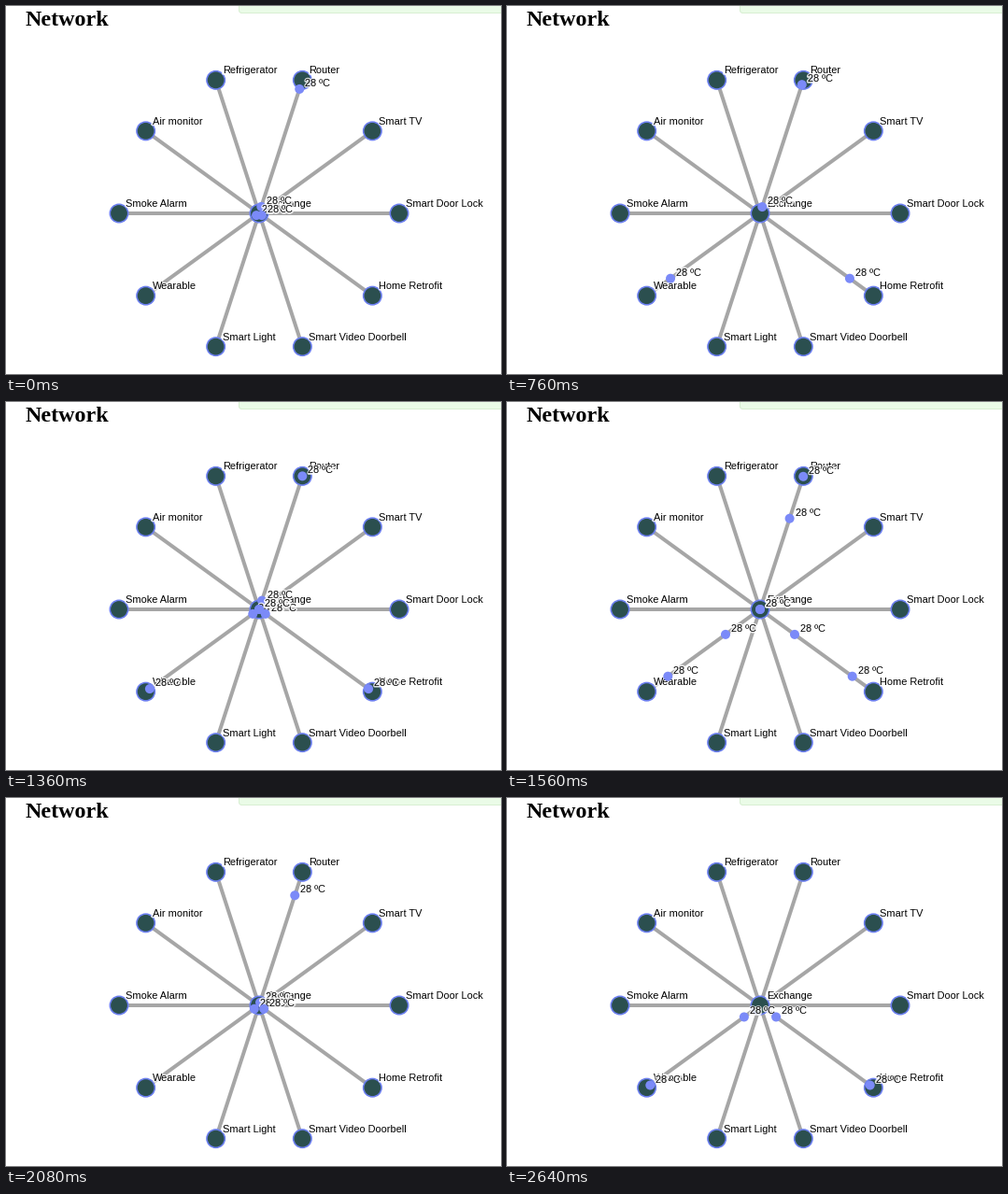
A matplotlib script that plays this animation: 530 px wide and 394 px high, repeating every 2.68 s.

```python
import math

import matplotlib.pyplot as plt
from matplotlib.animation import FuncAnimation
from matplotlib.patches import Circle, FancyBboxPatch
from matplotlib.patheffects import Stroke

W, H, DPI = 530, 394, 100
PX = 72 / DPI            # points per pixel
STEP, FRAMES = 40, 67    # ms per frame, frames per loop
TRAVEL = 500             # ms a packet needs for one spoke
HUB, RADIUS = (271, 222), 150

SLATE, RIM, PACKET, LINK = "#2b4f4f", "#6c7ff0", "#7b8af8", "#a6a6a6"

# clockwise, starting at the right
DEVICES = ["Smart Door Lock", "Home Retrofit", "Smart Video Doorbell",
           "Smart Light", "Wearable", "Smoke Alarm", "Air monitor",
           "Refrigerator", "Router", "Smart TV"]

# departure times in ms: readings reach the hub, which passes them on
TO_HUB = [-384, -128, 375, 658, 798, 987, 1345, 1514, 1668, 1904]
FROM_HUB = [-91, 188, 447, 963, 1240, 1348, 1550, 1970, 2082, 2238, 2476]

fig = plt.figure(figsize=(W / DPI, H / DPI), dpi=DPI, facecolor="white")
ax = fig.add_axes([0, 0, 1, 1])
ax.set_xlim(0, W)
ax.set_ylim(H, 0)
ax.axis("off")


def label(x, y, text, z):
    """Small text above a translucent white halo."""
    style = dict(family="Liberation Sans", size=11 * PX, va="baseline")
    halo = ax.text(x, y, text, color="white", zorder=z, **style)
    halo.set_path_effects([Stroke(linewidth=3 * PX, foreground="white",
                                  alpha=0.8)])
    return halo, ax.text(x, y, text, color="black", zorder=z + 0.01, **style)


def node(pos, name):
    ax.add_patch(Circle(pos, 9.7, facecolor=SLATE, edgecolor=RIM,
                        linewidth=1.6 * PX, zorder=2))
    label(pos[0] + 7, pos[1] - 7, name, 3)


def ease(u):
    return 4 * u ** 3 if u < 0.5 else 1 - 4 * (1 - u) ** 3


class Packet:
    def __init__(self, start, src, dst, z):
        self.start, self.src, self.dst = start, src, dst
        self.dot = ax.add_patch(Circle(src, 5, facecolor=PACKET,
                                       linewidth=0, zorder=z))
        self.texts = label(*src, "28 ºC", z + 0.1)
        self.parts = [self.dot, *self.texts]

    def update(self, t):
        u = (t - self.start) / TRAVEL
        shown = 0 <= u < 1
        for part in self.parts:
            part.set_visible(shown)
        if shown:
            s = ease(u)
            x, y = (a + (b - a) * s for a, b in zip(self.src, self.dst))
            self.dot.center = x, y
            for text in self.texts:
                text.set_position((x + 6, y - 3))


# page furniture
ax.text(21, 21, "Network", family="Liberation Serif", weight="bold",
        size=24 * PX, va="baseline")
ax.add_patch(FancyBboxPatch((249.5, -40), 320, 47.5,
                            boxstyle="round,pad=0,rounding_size=3",
                            facecolor="#eafbe7", edgecolor="#d8efd2",
                            linewidth=PX))

# network
place = {}
for i, name in enumerate(DEVICES):
    a = 2 * math.pi * i / len(DEVICES)
    place[name] = (HUB[0] + RADIUS * math.cos(a),
                   HUB[1] + RADIUS * math.sin(a))
    ax.plot(*zip(HUB, place[name]), color=LINK, linewidth=4 * PX, zorder=1)
node(HUB, "Exchange")
for name, pos in place.items():
    node(pos, name)

# newer packets lie on top
trips = [(t, place["Router"], HUB) for t in TO_HUB]
for name in ("Wearable", "Home Retrofit"):
    trips += [(t, HUB, place[name]) for t in FROM_HUB]
packets = [Packet(*trip, 4 + i) for i, trip in enumerate(sorted(trips))]


def draw(frame):
    for packet in packets:
        packet.update(frame * STEP)
    return [part for packet in packets for part in packet.parts]


anim = FuncAnimation(fig, draw, frames=FRAMES, interval=STEP, repeat=True,
                     repeat_delay=0, blit=False)
plt.show()
```
